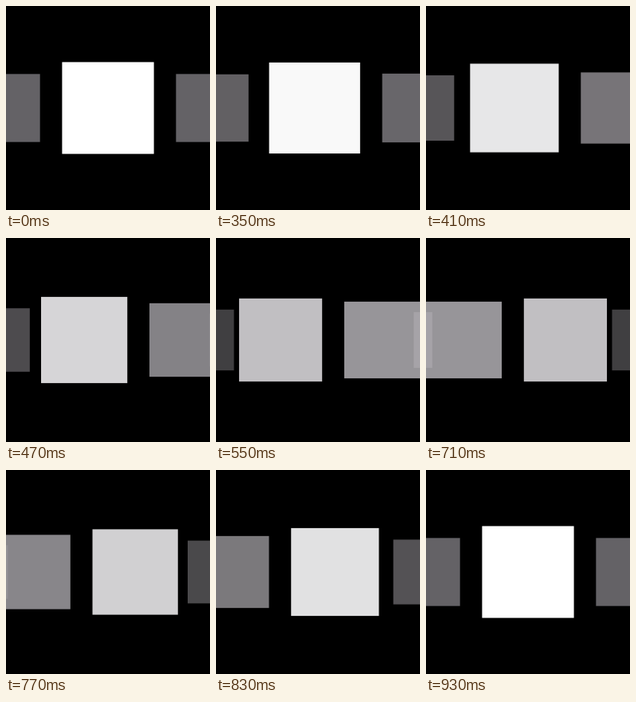
These frames come from a looping animation (256x256 px, 1100 ms). An HTML page with a canvas:

```html
<!DOCTYPE html>
<html lang="en">
<head>
<meta charset="utf-8">
<title>Sliding squares</title>
<style>
  html, body { margin: 0; height: 100%; overflow: hidden; background: #000; }
  canvas { display: block; width: 256px; height: 256px; }
</style>
</head>
<body>
<canvas width="256" height="256"></canvas>
<script>
const ctx = document.querySelector('canvas').getContext('2d');
const LOOP = 1100, START = 350, STEP = 20, STEPS = 30;

// Values at slots 0, 1 and 2, counted from the middle
const OFFSET = [0, 128, 170.67];
const SIZE = [115.2, 85.33, 60.8];
const ALPHA = [1, 0.4, 0];

function at(list, d) {
  const i = Math.min(Math.floor(d), 1);
  return list[i] + (list[i + 1] - list[i]) * (d - i);
}

function square(slot) {
  const d = Math.abs(slot), near = Math.min(d, 1);
  const x = 128 + Math.sign(slot) * at(OFFSET, d);
  const size = at(SIZE, d);
  const alpha = at(ALPHA, d) - 0.09 * near * (1 - near);
  ctx.fillStyle = `rgba(${255 - 4 * near}, ${255 - 9 * near}, 255, ${alpha})`;
  ctx.fillRect(x - size / 2, 128 - size / 2, size, size);
}

function draw(now) {
  const t = (now + 0.1) % LOOP;
  const step = Math.floor((t - START) / STEP) + 1;
  const p = Math.min(Math.max(step / STEPS, 0), 1);
  ctx.fillStyle = '#000';
  ctx.fillRect(0, 0, 256, 256);
  for (let i = -1; i <= 2; i++) square(i - p);
  requestAnimationFrame(draw);
}
requestAnimationFrame(draw);
</script>
</body>
</html>
```
